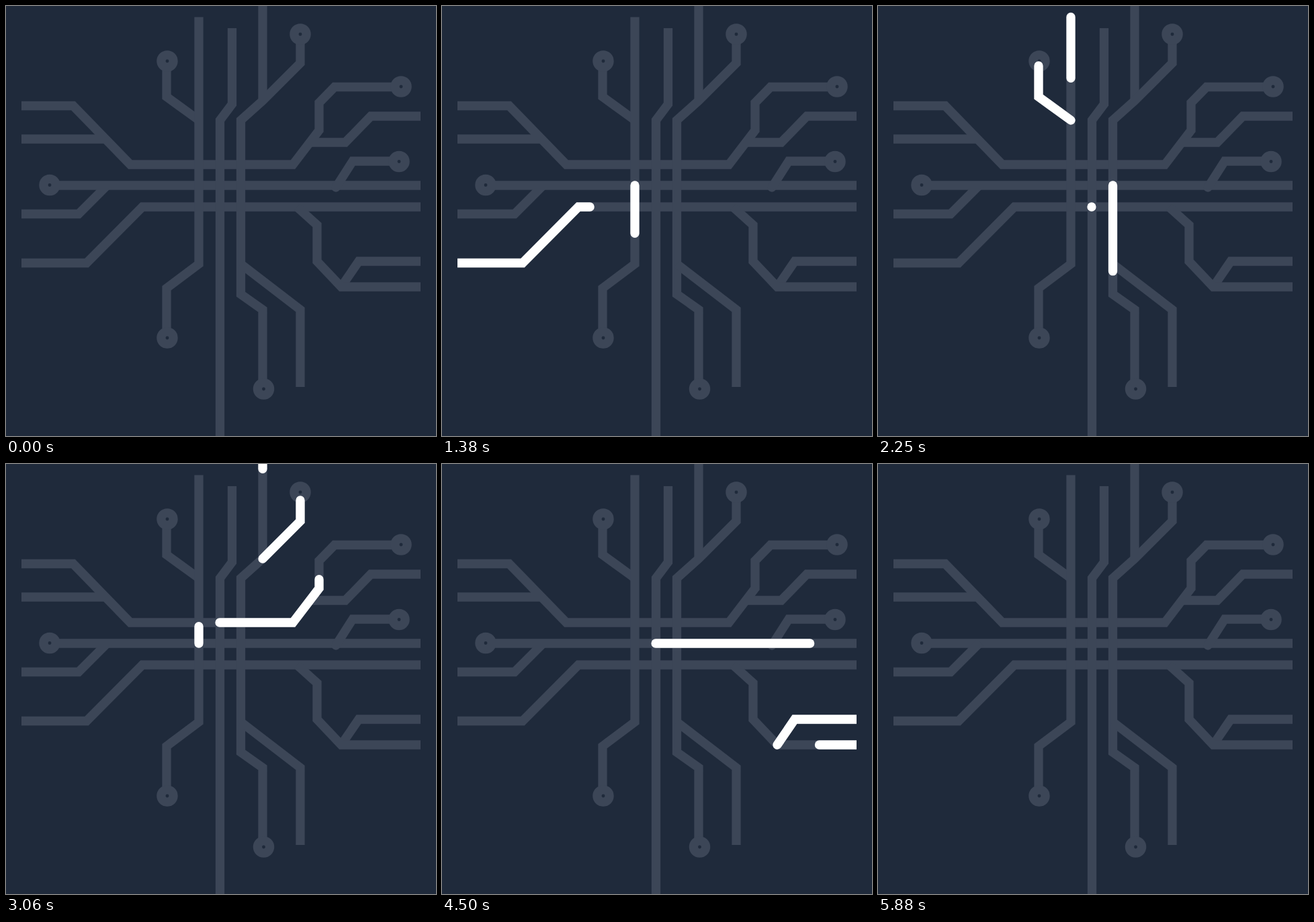
Write an HTML page that moves like this. It is 640 px wide and 640 px high and loops after 6330 ms.

```html
<!DOCTYPE html>
<html lang="en">
<head>
<meta charset="utf-8">
<title>Circuit pulses</title>
<style>
  html, body { margin: 0; width: 100%; height: 100%; overflow: hidden; background: #1f2a3b; }
  svg { display: block; width: 100%; height: 100%; }
  path, circle { fill: none; stroke-width: 13.3; }
  #board { stroke: #3c4657; }
  #pulses { stroke: #fff; stroke-linecap: round; }
</style>
</head>
<body>
<svg viewBox="0 0 640 640">
  <clipPath id="edge"><rect x="23" y="0" width="594" height="640"/></clipPath>
  <g id="board"></g>
  <g id="pulses" clip-path="url(#edge)"></g>
</svg>
<script>
const LOOP = 6330, END = 5880, STEP = 30;
const NS = 'http://www.w3.org/2000/svg';
const board = document.getElementById('board');
const pulses = document.getElementById('pulses');

function add(parent, tag, attrs) {
  const el = document.createElementNS(NS, tag);
  for (const k in attrs) el.setAttribute(k, attrs[k]);
  return parent.appendChild(el);
}

const traces = [
  'M23 148.5H100L185 236H427L466 185V144L489 120.5H578',
  'M23 198H147',
  'M75 267H617',
  'M23 309.5H108L152 265.5',
  'M23 382.5H120L203 299H617',
  'M239 91V135L287 170',
  'M287 16.5V384L239 420V485',
  'M336.5 33V146L318.5 170V640',
  'M382 0V141',
  'M438 51V85L382 141L349.5 170V429L382 452V561',
  'M349.5 384L438 452V567',
  'M617 164H543L505 203H455',
  'M617 380H525L499 418',
  'M617 418H499L463 380V326L433 299'
];
traces.forEach(d => add(board, 'path', { d }));
add(board, 'path', { d: 'M575 231H516L491 270', 'stroke-linecap': 'round' });

const pads = [[240, 82], [438, 42], [588, 120], [585, 231.5], [65, 266.5], [240, 494], [383.5, 570]];
pads.forEach(([cx, cy]) => add(board, 'circle', { cx, cy, r: 9.1 }));

// path, head start, head time, tail start, tail time
const LONG = 430, FADE = 850, SHORT = 250;
const runs = [
  ['M23 198H147', 10, SHORT, 320, SHORT],
  ['M336.5 33V146L318.5 170V267', 30, LONG, 446, FADE],
  ['M240 485a9.1 9.1 0 1 1 -.1 0L239 420L287 384V267', 540, LONG, 947, FADE],
  ['M23 382.5H120L203 299H318', 1052, LONG, 1490, 770],
  ['M383.5 561a9.1 9.1 0 1 1 -.1 0L382 552V452L349.5 429V267', 1520, LONG, 1902, FADE],
  ['M239 89V135L287 170', 1960, SHORT, 2290, SHORT],
  ['M287 16.5V267', 2053, LONG, 2480, FADE],
  ['M575 120.5H489L466 144V185L427 236H318', 2480, LONG, 2846, FADE],
  ['M438 54V85L382 141', 2800, SHORT, 3090, SHORT],
  ['M382 0V141L349.5 170V267', 3034, LONG, 3395, FADE],
  ['M318.5 640V267', 3478, LONG, 3840, 600],
  ['M573 231H516L491 270', 3890, SHORT, 4190, SHORT],
  ['M617 267H318', 4030, LONG, 4395, FADE],
  ['M617 380H525L499 418', 4230, SHORT, 4540, SHORT],
  ['M617 418H499L463 380V326L433 299H318', 4402, LONG, 4920, FADE],
  ['M74 267a9.1 9.1 0 1 1 0 -.1H318', 4780, LONG, 5210, 670]
].map(([d, start, rise, leave, fall]) => {
  const el = add(pulses, 'path', { d });
  return { el, start, rise, leave, fall, len: el.getTotalLength() };
});

const unit = x => Math.min(1, Math.max(0, x));
const headEase = u => Math.pow(u, 1.3);
const tailEase = u => 1 - (1 - u) * (1 - u);

function draw(ms) {
  const t = Math.floor((ms % LOOP) / STEP) * STEP;
  for (const r of runs) {
    const head = headEase(unit((t - r.start) / r.rise));
    const tail = tailEase(unit((t - r.leave) / r.fall));
    const on = t < END && head > tail;
    r.el.style.display = on ? '' : 'none';
    if (!on) continue;
    r.el.setAttribute('stroke-dasharray', `${(head - tail) * r.len} ${r.len * 2}`);
    r.el.setAttribute('stroke-dashoffset', -tail * r.len);
  }
}

const began = performance.now();
function tick() {
  draw(performance.now() - began);
  requestAnimationFrame(tick);
}
draw(0);
requestAnimationFrame(tick);
</script>
</body>
</html>
```
